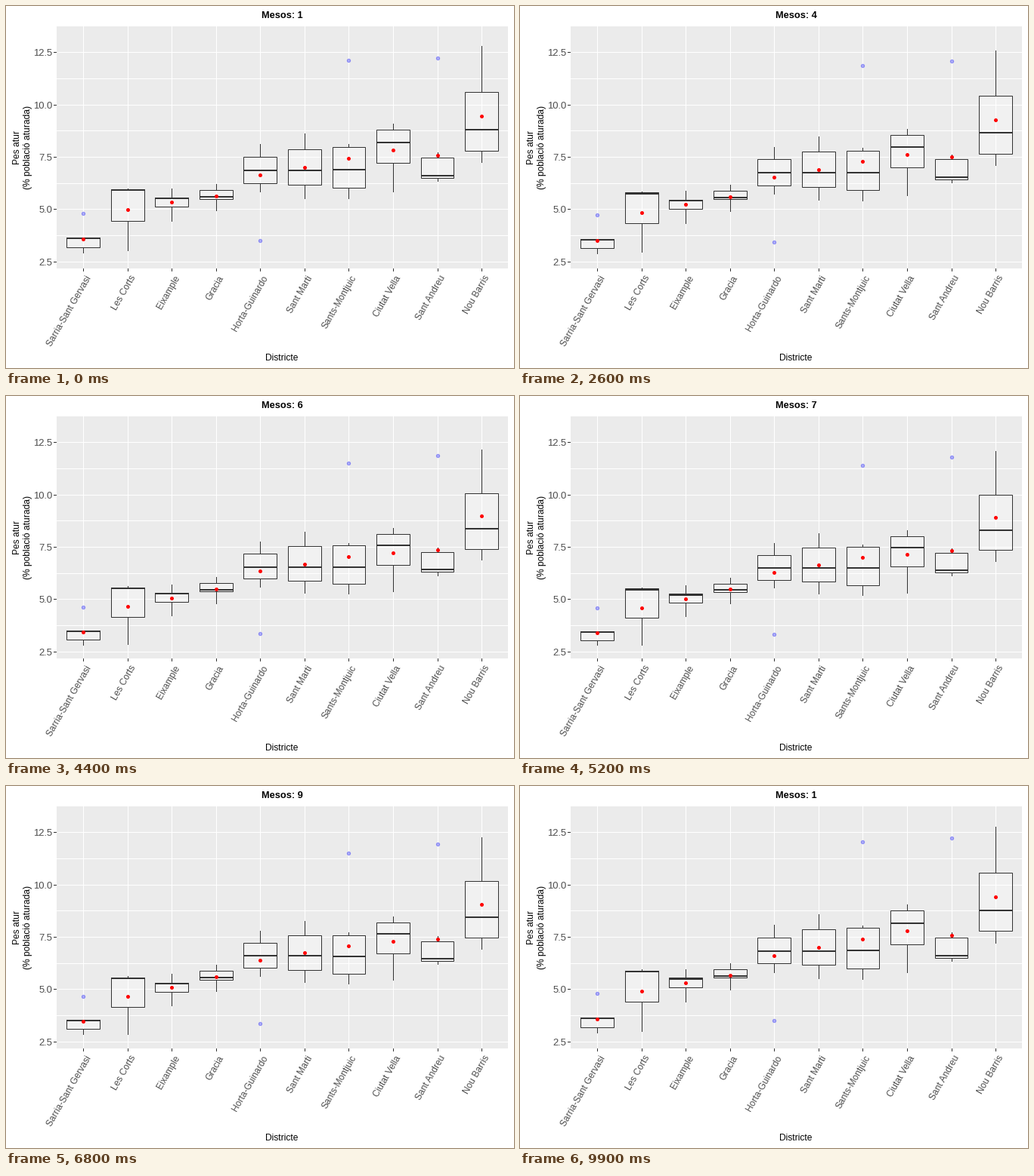
Animation of 672x480 px, one loop 10000 ms. Source, as a matplotlib script:

```python
import numpy as np
import matplotlib.pyplot as plt
from matplotlib.animation import FuncAnimation
from matplotlib.patches import Circle, Rectangle

W, H, DPI = 672, 480, 96
PX = 72 / DPI
LEFT, RIGHT, TOP, BOTTOM = 67, 664, 27, 348
X0, STEP = 67.095, 58.54
V_MIN, V_MAX = 2.175, 13.725
INK, GREY = "#333333", "#4d4d4d"

plt.rcParams["font.family"] = "Liberation Sans"
fig = plt.figure(figsize=(W / DPI, H / DPI), dpi=DPI, facecolor="white")
ax = fig.add_axes([0, 0, 1, 1])
ax.set_xlim(0, W)
ax.set_ylim(H, 0)
ax.axis("off")


def y_of(v):
    return int(round(BOTTOM - (v - V_MIN) * (BOTTOM - TOP) / (V_MAX - V_MIN)))


def x_of(i):
    return X0 + (i + 0.6) * STEP


def bar(x, y, w, h, color, z):
    return ax.add_patch(Rectangle((x, y), w, h, fc=color, ec="none", lw=0, zorder=z))


def label(x, y, s, size, color="black", **kw):
    return ax.text(x, y, s, fontsize=size * PX, color=color, va="baseline",
                   rotation_mode="anchor", zorder=9, **kw)


def summer(month):
    """Seasonal dip: a small spring peak, lowest in July, gone by November."""
    return np.interp(month, [1, 3, 5, 7, 9, 11], [0, -0.15, 0.75, 1, 0.67, 0])


class District:
    """A January box that follows the season and a yearly drift."""

    def __init__(self, i, name, january, mean, out, dip, drift):
        self.january, self.mean, self.out = np.array(january), mean, out
        self.dip, self.drift = dip, drift
        cx, half = x_of(i), 0.375 * STEP
        self.x = round(cx)
        x0, x1 = round(cx - half), round(cx + half)
        self.low = bar(self.x, 0, 1, 0, INK, 3)
        self.high = bar(self.x, 0, 1, 0, INK, 3)
        self.box = ax.add_patch(Rectangle(
            (x0 + 0.5, 0), x1 - x0, 0,
            fc=(1, 1, 1, 0.35), ec=INK, lw=PX, zorder=4, snap=False))
        self.mid = bar(x0, 0, x1 - x0 + 1, 2, INK, 5)
        self.spot = ax.add_patch(Circle(
            (0, 0), 2.2, fc=(0, 0, 1, 0.3), ec=(0, 0, 1, 0.3), lw=PX,
            zorder=6, visible=out is not None))
        self.dot = ax.add_patch(Circle((0, 0), 2.5, fc="red", ec="none", zorder=7))
        bar(self.x, TOP, 1, BOTTOM - TOP, "white", 1)
        bar(self.x, BOTTOM, 1, 4, INK, 2)
        label(cx + 10.5, 360, name, 12, GREY, rotation=60, ha="right")

    def level(self, month):
        return 1 - self.dip * summer(month) + self.drift * (month - 1) / 10

    def pose(self, a, b, f):
        k = self.level(a) * (1 - f) + self.level(b) * f
        lo, q1, med, q3, hi = (y_of(v) for v in self.january * k)
        self.low.set(y=q1, height=lo - q1)
        self.high.set(y=hi, height=q3 - hi)
        self.box.set(y=q3 + 0.5, height=q1 - q3)
        self.mid.set_y(med - 1)
        self.dot.center = (self.x + 0.5, y_of(self.mean * k) + 0.5)
        if self.out is not None:
            self.spot.center = (self.x + 0.5, y_of(self.out * k) + 0.5)


districts = []


def add(name, january, mean, out=None, dip=0.045, drift=-0.01):
    districts.append(District(len(districts), name, january, mean, out, dip, drift))


# panel, grid and axes
bar(LEFT, TOP, RIGHT - LEFT, BOTTOM - TOP, "#ebebeb", 0)
for n in range(9):
    v = 2.5 + 1.25 * n
    y = y_of(v)
    bar(LEFT, y, RIGHT - LEFT, 1, "white", 1)
    if n % 2 == 0:
        bar(LEFT - 4, y, 4, 1, INK, 2)
        label(61.5, y + 5.3, f"{v:.1f}", 13, GREY, ha="right")

title = label(365.7, 16, "", 12.8, weight="bold", ha="center")
label(365, 470, "Districte", 12, ha="center")
label(18, 187.5, "Pes atur", 12, rotation=90, ha="center")
label(32, 187.5, "(% població aturada)", 12, rotation=90, ha="center")

# low, lower hinge, median, upper hinge and high in January
add("Sarria-Sant Gervasi", [2.9, 3.2, 3.6, 3.6, 3.6], 3.57, out=4.8, drift=0)
add("Les Corts", [3.0, 4.45, 5.9, 5.95, 6.0], 4.97, dip=0.054, drift=-0.034)
add("Eixample", [4.4, 5.12, 5.53, 5.57, 6.0], 5.33, drift=-0.02)
add("Gracia", [4.9, 5.5, 5.6, 5.9, 6.2], 5.62, drift=0.03)
add("Horta-Guinardo", [5.8, 6.25, 6.85, 7.5, 8.1], 6.63, out=3.5)
add("Sant Marti", [5.5, 6.17, 6.85, 7.87, 8.6], 7.0)
add("Sants-Montjuic", [5.5, 6.03, 6.9, 7.97, 8.1], 7.43, out=12.1, drift=-0.024)
add("Ciutat Vella", [5.8, 7.2, 8.2, 8.8, 9.1], 7.83, dip=0.076, drift=-0.023)
add("Sant Andreu", [6.3, 6.5, 6.6, 7.47, 7.7], 7.58, out=12.2, dip=0.034, drift=0)
add("Nou Barris", [7.2, 7.8, 8.8, 10.6, 12.8], 9.45, dip=0.052)

# first step of each move to the next month
starts = [5 + 9 * k - max(0, k - 4) for k in range(12)]


def update(i):
    done = sum(s <= i for s in starts)
    a, b, f = 1, 1, 1.0
    if done:
        a, b = done, done % 12 + 1
        f = min((i - starts[done - 1] + 1) / 4, 1.0)
    for d in districts:
        d.pose(a, b, f)
    title.set_text(f"Mesos: {b if f >= 0.5 else a}")
    return []


anim = FuncAnimation(fig, update, frames=100, interval=100,
                     init_func=lambda: update(0), repeat=True,
                     repeat_delay=0, blit=False)
plt.show()
```
